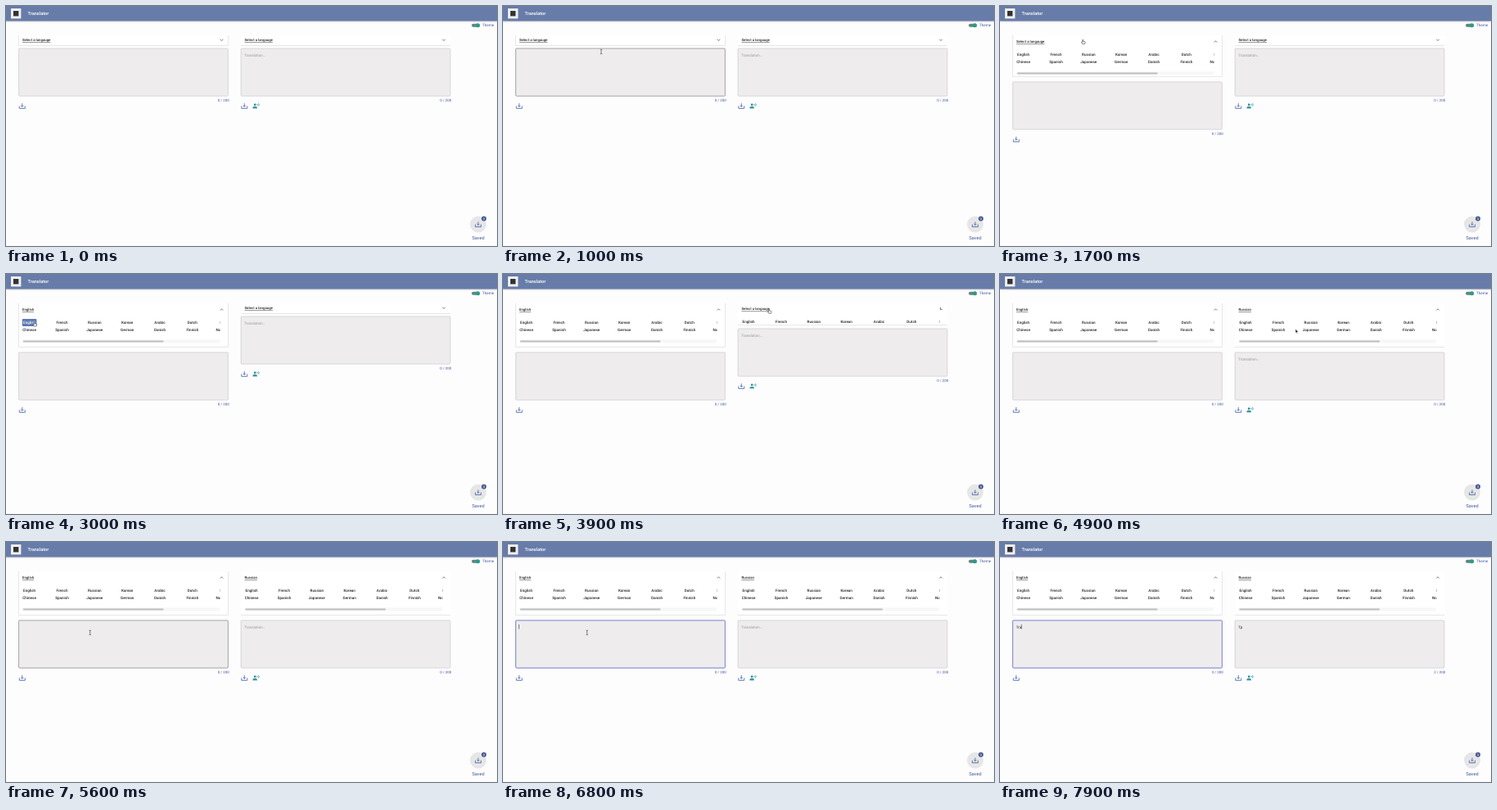
An HTML page for the animation above (8 s loop, 600 by 294 pixels).

```html
<!DOCTYPE html>
<html lang="en">
<head>
<meta charset="utf-8">
<title>Translator</title>
<style>
  html, body { margin: 0; width: 100%; height: 100%; overflow: hidden; background: #fdfdfe; }
  #stage { display: block; width: 100vw; height: 100vh; }
  text { font-family: Roboto, Arial, sans-serif; font-size: 4.55px; text-rendering: geometricPrecision; white-space: pre; }
  .med { font-weight: 500; }
  .blue { fill: #40579a; }
  .line { fill: none; stroke-linejoin: round; }
  .card { fill: #fff; filter: drop-shadow(0 .5px .35px rgba(0, 0, 0, .36)); }
  .bar { filter: drop-shadow(0 .7px .8px rgba(0, 0, 0, .4)); }
</style>
</head>
<body>
<svg id="stage" viewBox="0 0 600 294"></svg>
<script>
const NS = "http://www.w3.org/2000/svg";
const stage = document.getElementById("stage");
const LOOP = 8000, STEP = 100;

function set(node, attrs) {
  for (const key in attrs) node.setAttribute(key, attrs[key]);
  return node;
}
function add(parent, tag, attrs) {
  return parent.appendChild(set(document.createElementNS(NS, tag), attrs));
}
function label(parent, str, x, mid, size, attrs) {
  const node = add(parent, "text", { x, y: mid + size * 0.36, ...attrs });
  node.style.fontSize = size + "px";
  node.textContent = str;
  return node;
}
function move(node, x, y, turn = 0) {
  node.setAttribute("transform", `translate(${x} ${y}) rotate(${turn})`);
}
function show(node, on) {
  node.setAttribute("visibility", on ? "visible" : "hidden");
}
function write(node, str) {
  if (node.textContent !== str) node.textContent = str;
}

function saveIcon(parent, x, y) {
  return add(parent, "path", {
    d: "M0 3.3V6.2H7V3.3M3.5 0V4.1M1.9 2.6L3.5 4.2L5.1 2.6", class: "line",
    stroke: "#3f5fa6", "stroke-width": 0.8, transform: `translate(${x} ${y})`
  });
}
function speakIcon(parent, x, y) {
  const g = add(parent, "g", { transform: `translate(${x} ${y})`, fill: "#33929a" });
  add(g, "circle", { cx: 2.7, cy: 1.7, r: 1.4 });
  add(g, "path", { d: "M0 6.2V5.3Q0 3.9 2.7 3.9T5.4 5.3V6.2Z" });
  add(g, "path", {
    d: "M5.4 .8Q6.2 1.7 5.4 2.7M7 0Q8.5 1.7 7 3.5", class: "line",
    stroke: "#33929a", "stroke-width": 0.8
  });
}

// Page frame
add(stage, "rect", { width: 600, height: 294, fill: "#fdfdfe" });
add(stage, "rect", { width: 600, height: 18.4, fill: "#677ca9", class: "bar" });
add(stage, "rect", { x: 6, y: 3, width: 12.4, height: 12.4, fill: "#efeff0" });
add(stage, "rect", { x: 9, y: 6, width: 6.4, height: 6.4, fill: "#333" });
label(stage, "Translator", 26.5, 9, 5.65, { class: "med", fill: "#fff" });
add(stage, "rect", { x: 569, y: 21.8, width: 10, height: 4, rx: 2, fill: "#638579" });
add(stage, "circle", { cx: 576.6, cy: 23.8, r: 2.5, fill: "#2c9c8b" });
label(stage, "Theme", 582, 23.8, 4.6, { class: "blue" });
add(stage, "circle", { cx: 577, cy: 267.5, r: 10, fill: "#e7e6e7" });
saveIcon(stage, 573.5, 264.3);
add(stage, "circle", { cx: 584, cy: 260.5, r: 3, fill: "#485c92" });
label(stage, "3", 584, 260.5, 3.6, { class: "med", fill: "#fff", "text-anchor": "middle" });
label(stage, "Saved", 577, 283.7, 5.6, { class: "blue", "text-anchor": "middle" });

const LANGS = [
  ["English", "French", "Russian", "Korean", "Arabic", "Dutch", "Italian"],
  ["Chinese", "Spanish", "Japanese", "German", "Danish", "Finnish", "Norwegian"]
];

// One half of the page; dx is its left shift, pick the column that gets chosen
function makePanel(dx, pick, clip, speak) {
  const root = add(stage, "g", { transform: `translate(${dx} 0)` });
  const card = add(root, "rect", { x: 15.5, y: 36, width: 256, height: 12.5, class: "card" });
  const title = label(root, "", 20, 0, 4.33, { class: "med", fill: "#222" });
  const under = add(root, "rect", { x: 20, height: 0.5, fill: "#333" });
  const chevron = add(root, "path", {
    d: "M-1.7 -.9L0 .9L1.7 -.9", class: "line", stroke: "#555", "stroke-width": 0.75
  });

  const view = add(root, "svg", { x: 0, y: 36, width: clip, height: 0, overflow: "hidden" });
  const list = add(view, "g", {});
  const mark = add(list, "rect", { y: -4.5, height: 9, rx: 1.2, fill: "#5f78b3" });
  let chosen;
  LANGS.forEach((row, r) => row.forEach((name, c) => {
    const node = label(list, name, 28.6 + 39.85 * c, r * 9.2, 4.6,
      { class: "med", fill: "#222", "text-anchor": "middle" });
    if (r === 0 && c === pick) chosen = node;
  }));
  add(list, "rect", { x: 20.5, y: 20.8, width: 241, height: 4.2, fill: "#f7f7f8" });
  add(list, "rect", { x: 20.8, y: 22, width: 171.8, height: 2, rx: 1, fill: "#bfbebf" });

  const lower = add(root, "g", {});
  const box = add(lower, "rect", { x: 15.6, y: 0, width: 255.8, height: 58.3, rx: 1, fill: "#eeeced" });
  const text = label(lower, "", 19.7, 8, 4.55, {});
  const caret = add(lower, "rect", { y: 5, width: 0.6, height: 5.6, fill: "#333" });
  const count = label(lower, "", 272.7, 63.2, 4.4, { class: "blue", "text-anchor": "end" });
  saveIcon(lower, 16.3, 67.2);
  if (speak) speakIcon(lower, 30, 67.2);

  return function draw(s) {
    const bottom = 48.5 + 41 * s.open;
    const head = 41.5 + 2 * s.head;
    set(card, { height: bottom - 36 });
    write(title, s.title);
    set(title, { y: head + 1.56 });
    set(under, { y: head + 2.9, width: title.getComputedTextLength() });
    move(chevron, 263.5, head + 0.1, s.turn);

    set(view, { height: bottom - 36 });
    show(view, s.open > 0);
    move(list, 0, 56.5 + 3 * s.head - 36);
    const half = chosen.getComputedTextLength() / 2 + 1.3;
    set(mark, { x: 28.6 + 39.85 * pick - half, width: half * 2, opacity: s.hover });
    set(chosen, { fill: s.hover > 0.4 ? "#fff" : "#222" });

    move(lower, 0, 52 + 44 * s.open);
    set(box, { stroke: s.edge, "stroke-width": s.edge === FOCUS ? 0.8 : 0.5 });
    write(text, s.text);
    set(text, { fill: s.faint ? "#999" : "#222" });
    set(caret, { x: 19.4 + text.getComputedTextLength() });
    show(caret, s.caret);
    write(count, s.count + " / 200");
  };
}

const IDLE = "#bbb9ba", HOVER = "#555", FOCUS = "#5a63bd";
const drawLeft = makePanel(0, 0, 261.6, false);
const drawRight = makePanel(271.5, 2, 262, true);

// Pointers, each drawn around its hot spot
const pointers = {
  hand: add(stage, "path", {
    d: "M-.5 .3Q0 -.4 .5 .3V2L2.6 2.5Q3 2.7 2.9 3.3L2.4 5.2H-.5L-1.8 3.2Q-1.6 2.5 -.5 3.2Z",
    fill: "#fff", stroke: "#222", "stroke-width": 0.55, "stroke-linejoin": "round"
  }),
  arrow: add(stage, "path", {
    d: "M0 0V4.4L1 3.5L1.7 5.1L2.4 4.8L1.7 3.3H3.1Z", fill: "#111", stroke: "#fff", "stroke-width": 0.25
  }),
  beam: add(stage, "path", {
    d: "M-1.2 -2.8Q0 -2.8 0 -2.1Q0 -2.8 1.2 -2.8M0 -2.1V2.1M-1.2 2.8Q0 2.8 0 2.1Q0 2.8 1.2 2.8",
    class: "line", stroke: "#222", "stroke-width": 0.55
  })
};
const PATH = [
  [100, 335, 277, "arrow"], [200, 300, 215, "arrow"], [300, 250, 150, "arrow"],
  [400, 195, 104, "beam"], [500, 172, 90, "beam"], [600, 172, 90, "beam"],
  [1000, 120, 56, "beam"], [1100, 110, 47, "hand"], [1300, 101.2, 41.2, "hand"],
  [1700, 101.2, 41.2, "hand"], [1900, 80, 49, "arrow"], [2200, 45, 58, "arrow"],
  [2400, 34.5, 58.8, "hand"], [3000, 34.7, 58.8, "hand"], [3100, 52, 58, "arrow"],
  [3400, 225, 50, "arrow"], [3500, 290, 45, "hand"], [3700, 325.2, 43, "hand"],
  [4000, 325.2, 43, "hand"], [4100, 332, 47, "arrow"], [4400, 374, 57, "hand"],
  [4600, 380, 58.3, "hand"], [4800, 378, 59, "hand"], [4900, 361.2, 67.6, "arrow"],
  [5100, 275, 91, "arrow"], [5200, 215, 102, "beam"], [5400, 130, 110, "beam"],
  [5600, 102.7, 111, "beam"], [7500, 0, 0, ""]
];

function drawPointer(t) {
  const i = PATH.findLastIndex(p => p[0] <= t);
  const a = PATH[i], b = PATH[i + 1];
  for (const kind in pointers) show(pointers[kind], !!a && a[3] === kind);
  if (!a || !b) return;
  const k = b[3] ? (t - a[0]) / (b[0] - a[0]) : 0;
  if (a[3]) move(pointers[a[3]], a[1] + (b[1] - a[1]) * k, a[2] + (b[2] - a[2]) * k);
}

// Accordion opening in 100 ms steps
function unfold(t, start) {
  const n = Math.floor((t - start) / STEP);
  if (n < 0) return { open: 0, head: 0, turn: 0 };
  return { open: [0.34, 0.93][n] ?? 1, head: n ? 1 : 0.6, turn: n ? 180 : 50 };
}
function glow(t, start, end) {
  return t < start || t >= end ? 0 : t < start + STEP ? 0.5 : 1;
}

function render(t) {
  const typed = "Tra".slice(0, t < 7500 ? 0 : Math.floor((t - 7300) / 200));
  const result = "Тр".slice(0, t < 7600 ? 0 : Math.floor((t - 7400) / 200));
  const over = (t >= 400 && t < 1100) || (t >= 5200 && t < 5700);
  const blink = t >= 5800 && Math.floor((t - 5800) / 500) % 2 === 0;
  const prompt = "Select a langauge";

  drawLeft({
    ...unfold(t, 1600),
    title: t < 2800 ? prompt : "English",
    hover: glow(t, 2500, 3100),
    edge: t >= 5700 ? FOCUS : over ? HOVER : IDLE,
    text: typed, count: typed.length,
    caret: blink || t >= 7500
  });
  drawRight({
    ...unfold(t, 3900),
    title: t < 4800 ? prompt : "Russian",
    hover: glow(t, 4500, 4900),
    edge: IDLE,
    text: result || "Translation...", faint: !result, count: result.length,
    caret: false
  });
  drawPointer(t);
}

const begin = performance.now();
function tick() {
  const t = (performance.now() - begin) % LOOP;
  render(Math.floor(t / STEP) * STEP);
  requestAnimationFrame(tick);
}
tick();
</script>
</body>
</html>
```
